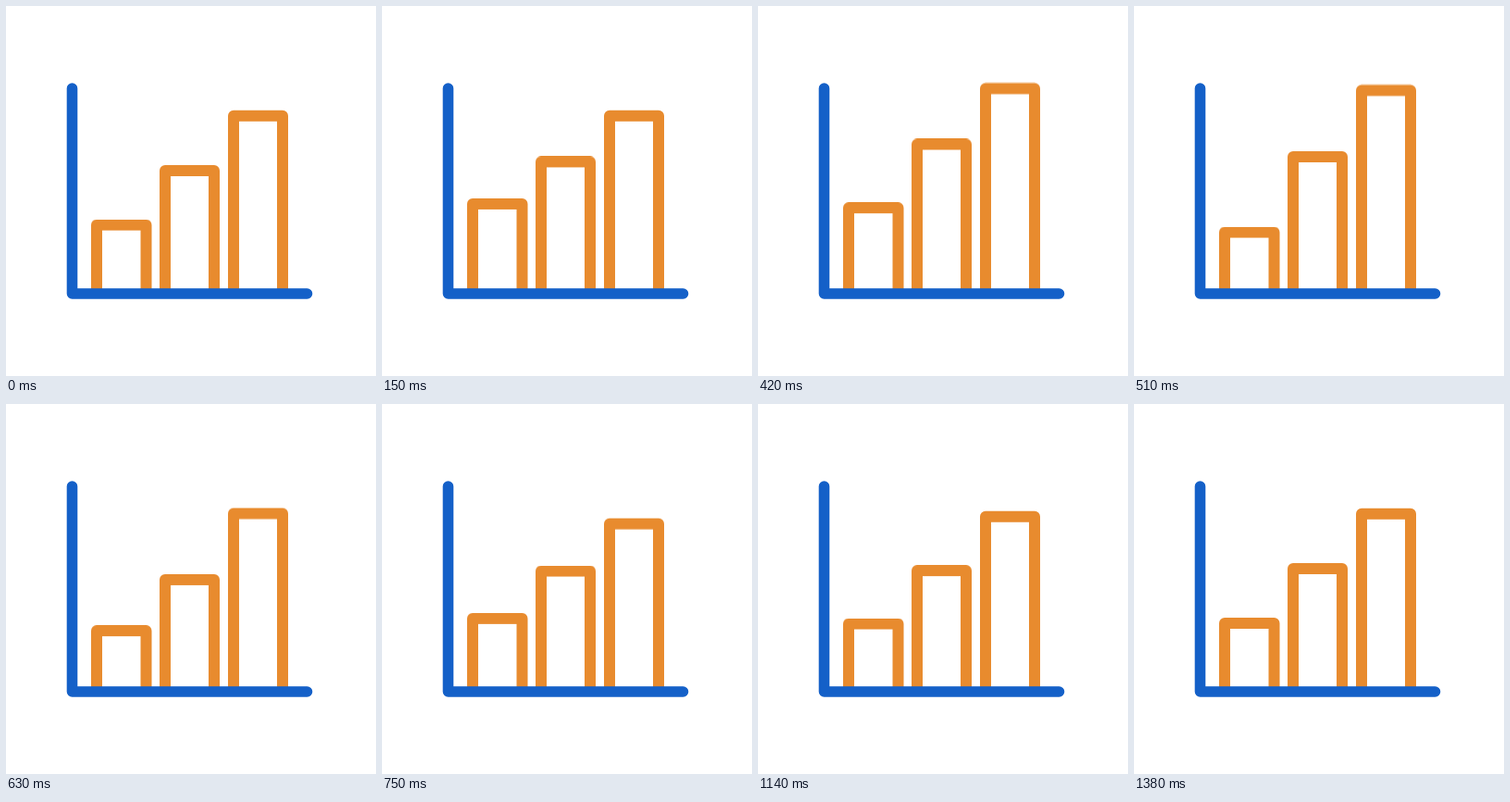
Write an HTML page that moves like this. It is 400 by 400 pixels and loops after 1440 ms.

```html
<!DOCTYPE html>
<html lang="en">
<head>
<meta charset="utf-8">
<title>Bar chart</title>
<style>
  html, body { margin: 0; width: 100%; height: 100%; overflow: hidden; background: #fff; }
  svg { display: block; width: 100%; height: 100%; }
  path { fill: none; stroke-linecap: round; stroke-linejoin: round; }
  .bar { stroke: #e88b2e; stroke-width: 12; animation: spring 1440ms infinite; }
  .bar:nth-child(2) { animation-delay: 75ms; }
  .bar:nth-child(3) { animation-delay: 150ms; }
  .axis { stroke: #1460c8; stroke-width: 11.6; }

  /* Damped bounce: up, down, up, down, rest */
  @keyframes spring {
    0% { transform: translateY(0); animation-timing-function: cubic-bezier(.3, 0, .25, 1); }
    20.83% { transform: translateY(-29.7px); animation-timing-function: cubic-bezier(.65, 0, .6, 1); }
    39.1% { transform: translateY(12px); animation-timing-function: cubic-bezier(.37, 0, .63, 1); }
    54.3% { transform: translateY(-6px); animation-timing-function: cubic-bezier(.37, 0, .63, 1); }
    68.4% { transform: translateY(3px); animation-timing-function: cubic-bezier(.37, 0, .63, 1); }
    83.3%, 100% { transform: translateY(0); }
  }
</style>
</head>
<body>
<svg viewBox="0 0 400 400">
  <clipPath id="above"><path d="M0 0H400V311H0Z"/></clipPath>
  <g clip-path="url(#above)">
    <path class="bar" d="M98 360V237H151.5V360"/>
    <path class="bar" d="M172 360V178H225V360"/>
    <path class="bar" d="M246 360V118.7H299V360"/>
  </g>
  <path class="axis" d="M71.5 89V311H325.5"/>
</svg>
</body>
</html>
```
